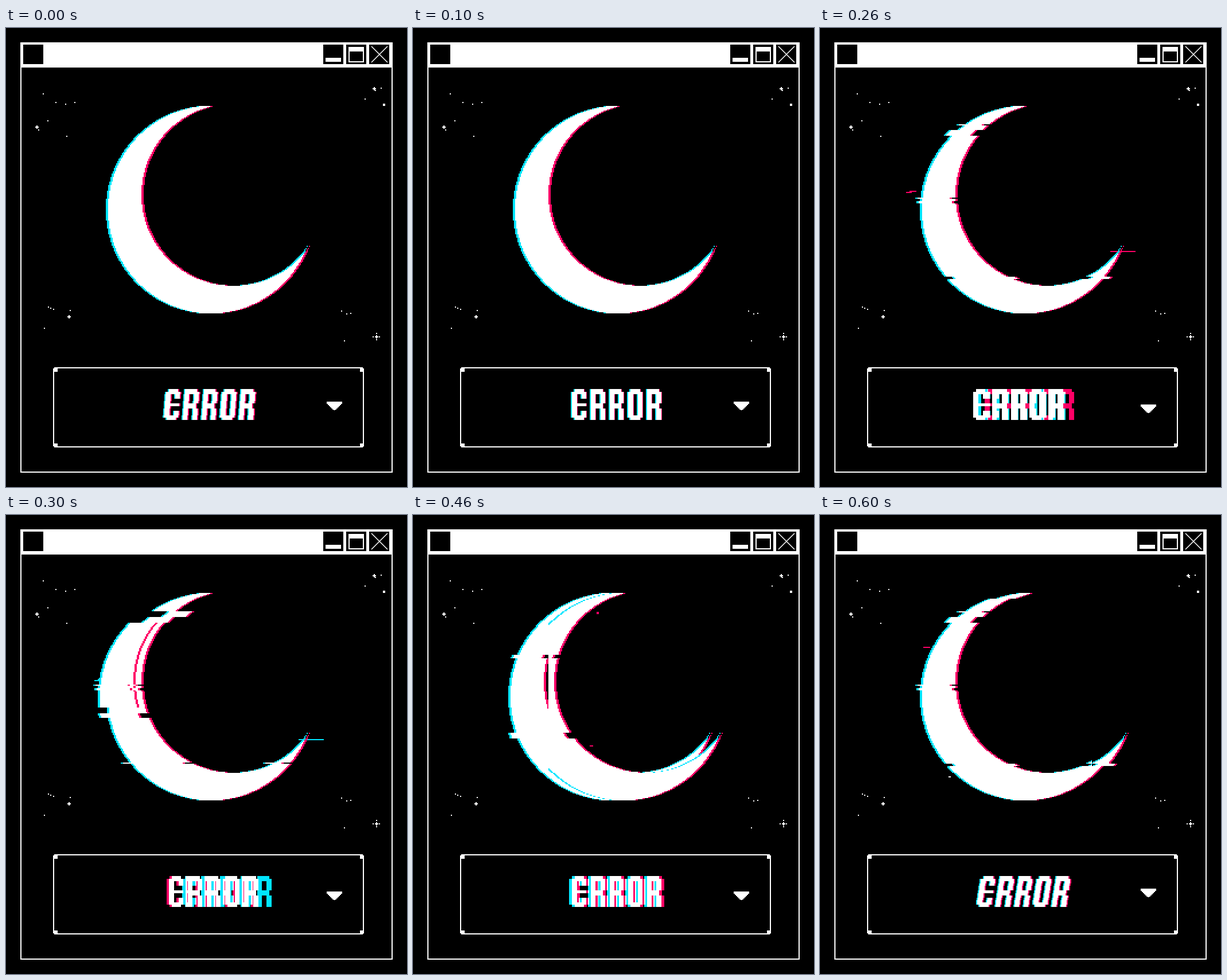
These frames come from a looping animation (699 px wide and 801 px high, 0.7 s). An HTML page with a canvas:

```html
<!DOCTYPE html>
<html lang="en">
<head>
<meta charset="utf-8">
<title>Error moon</title>
<style>
html, body { margin: 0; width: 100%; height: 100%; overflow: hidden; background: #000; }
canvas { display: block; }
</style>
</head>
<body>
<canvas id="stage" width="699" height="801"></canvas>
<script>
const g = document.getElementById('stage').getContext('2d');
const WHITE = '#fff', BLACK = '#000', CYAN = '#00e5ff', RED = '#ff0066';
const STEP = 100;

function box(color, x, y, w, h = w) {
  g.fillStyle = color;
  g.fillRect(x, y, w, h);
}

function frame(x, y, w, h) {
  g.strokeStyle = WHITE;
  g.lineWidth = 2;
  g.strokeRect(x + 1, y + 1, w - 2, h - 2);
}

function seeded(seed) {
  return () => (seed = seed * 16807 % 2147483647) / 2147483647;
}

// Colour split: white where both tints overlap
function tint(cyan, red) {
  return cyan && red ? WHITE : cyan ? CYAN : red ? RED : null;
}

function paint(left, top, right, bottom, size, colorAt) {
  for (let y = top; y < bottom; y += size) {
    for (let x = left; x < right; x += size) {
      const color = colorAt(x, y);
      if (color) box(color, x, y, size);
    }
  }
}

// Window

function drawTitleBar() {
  box(WHITE, 25, 25, 649, 44);
  for (const x of [30, 553, 593, 633]) box(BLACK, x, 29, 35, 34);
  box(WHITE, 557, 52, 27, 7);
  box(WHITE, 597, 33, 27);
  box(BLACK, 599, 41, 23, 17);
  g.lineWidth = 1.5;
  g.beginPath();
  g.moveTo(637, 32);
  g.lineTo(665, 60);
  g.moveTo(665, 32);
  g.lineTo(637, 60);
  g.stroke();
}

function sparkle(x, y) {
  box(WHITE, x - 3, y - 1, 6, 2);
  box(WHITE, x - 1, y - 3, 2, 6);
}

function starCluster(x, y, w, h, count) {
  const random = seeded(x * y);
  for (let i = 0; i < count; i++) {
    box(WHITE, Math.round(x + random() * w), Math.round(y + random() * h), 2);
  }
}

function drawSky() {
  starCluster(53, 88, 80, 180, 7);
  starCluster(599, 92, 60, 40, 3);
  starCluster(63, 461, 60, 107, 5);
  starCluster(580, 483, 48, 62, 4);
  box(WHITE, 657, 132, 4);
  sparkle(54, 173);
  sparkle(642, 106);
  sparkle(110, 504);
  sparkle(646, 539);
  for (const d of [-6, 5]) {
    box(WHITE, 645 + d, 538, 2);
    box(WHITE, 645, 538 + d, 2);
  }
}

function drawMessageBox() {
  frame(82, 592, 542, 140);
  for (const right of [0, 1]) {
    for (const low of [0, 1]) {
      box(BLACK, 82 + right * 540, 592 + low * 138, 2);
      box(WHITE, 84 + right * 533, 594 + low * 131, 6);
    }
  }
}

function drawCaret(y) {
  for (let i = 0; i < 8; i++) {
    const inset = 2 * Math.max(0, i - 1);
    box(WHITE, 559 + inset, y + 2 * i, 27 - 2 * inset, i < 7 ? 2 : 1);
  }
}

// Moon: one disc cut out of another, with torn rows and shifted ghosts

const inMoon = (x, y) =>
  Math.hypot(x - 357.5, y - 317) < 181.5 && Math.hypot(x - 396.5, y - 291) > 158.5;

const tear = (y, h, dx, from = 0, to = 699) => ({ y, h, dx, from, to });
const ghost = (dx, left = 140, top = 136, bottom = 498) => ({ dx, left, top, bottom });

function drawMoon(tears, ghosts) {
  for (const { dx, left, top, bottom } of ghosts) {
    paint(left, top, 570, bottom, 2, (x, y) => {
      let sx = x + 1 - dx;
      for (const t of tears) {
        if (y >= t.y && y < t.y + t.h && x >= t.from && x < t.to) sx -= t.dx;
      }
      return tint(inMoon(sx + 2, y + 1), inMoon(sx - 2, y + 1));
    });
  }
}

function drawStreak(color, x, y) {
  box(color, x, y, 44, 2);
  box(color, x - 350, y - 105, 12, 2);
  box(color, x - 356, y - 103, 10, 2);
}

// Word: each letter is a rule on a 6 by 13 grid

const roundCorner = (u, v) => (u === 0 || u === 5) && (v === 0 || v === 12);
const isCap = v => v < 2 || v > 10;
const LETTERS = {
  E: (u, v) => !roundCorner(u, v) &&
    (u < 2 || isCap(v) || v === 6 || (u > 3 && (v < 4 || v > 8))),
  R: (u, v) => !(u === 5 && (v === 0 || v === 6 || v === 7)) &&
    (u < 2 || u > 3 || v < 2 || v === 6 || v === 7),
  O: (u, v) => !roundCorner(u, v) && (u < 2 || u > 3 || isCap(v))
};

function inWord(x, v) {
  const pitch = 32.6, cell = 4.12;
  const index = Math.floor((x - 277) / pitch);
  const letter = LETTERS['ERROR'[index]];
  const u = Math.floor((x - 277 - index * pitch) / cell);
  return Boolean(letter) && u < 6 && letter(u, v);
}

function drawWord({ cyan = -2, red = 2, white = 0, slant = 0, rip = 0 }) {
  paint(250, 630, 480, 684, 1, (x, y) => {
    const v = Math.floor((y - 630) / 54 * 13);
    const lean = Math.round(slant * (0.5 - v / 12)) + (v === 5 || v === 6 ? rip : 0);
    const sx = x - lean;
    if (inWord(sx - white, v)) return WHITE;
    return tint(inWord(sx - cyan, v), inWord(sx - red, v));
  });
}

// Poses

const HAIRS = [tear(296, 2, -10), tear(302, 4, -6)];
const NICKS = [...HAIRS, tear(168, 2, -12), tear(178, 10, -13), tear(434, 4, 12)];

const POSES = [
  { word: { slant: 4 } },
  { word: { red: 1 } },
  {
    word: { cyan: -5, red: 10, white: -10 },
    low: true,
    tears: NICKS,
    extras() { drawStreak(RED, 506, 389); }
  },
  {
    word: { cyan: 30, red: 3, white: 7 },
    low: true,
    tears: [...HAIRS, tear(168, 10, 30), tear(178, 10, 8), tear(346, 8, -16), tear(432, 2, -16)],
    ghosts: [ghost(0), ghost(-14, 140, 188, 336)],
    extras() { drawStreak(CYAN, 510, 391); }
  },
  {
    word: { cyan: -5, red: 5 },
    low: true,
    tears: [tear(244, 6, -9), tear(380, 10, -12, 0, 400)],
    ghosts: [ghost(-8), ghost(10, 236)],
    extras() {
      box(RED, 320, 169, 4);
      box(RED, 308, 402, 6, 2);
    }
  },
  {
    word: { slant: 7, rip: -5 },
    tears: [tear(142, 2, -8), tear(146, 2, 8), tear(232, 22, 18), tear(350, 6, -8), tear(410, 2, -20)],
    extras() {
      box(WHITE, 323, 170, 4);
      box(RED, 314, 404, 4);
      box(CYAN, 224, 450, 4);
    }
  },
  {
    word: { slant: 8 },
    tears: [...NICKS, tear(136, 10, 10), tear(370, 68, 8, 474)],
    extras() {
      box(RED, 180, 230, 12, 2);
      box(WHITE, 224, 456, 4, 2);
    }
  }
];

function draw({ word, low = false, tears = [], ghosts = [ghost(0)], extras }) {
  box(BLACK, 0, 0, 699, 801);
  frame(25, 25, 649, 751);
  drawTitleBar();
  drawSky();
  drawMessageBox();
  if (extras) extras();
  drawMoon(tears, ghosts);
  drawWord(word);
  drawCaret(low ? 657 : 652);
}

let shown = -1;
function tick() {
  const pose = Math.floor(performance.now() / STEP) % POSES.length;
  if (pose !== shown) draw(POSES[shown = pose]);
  requestAnimationFrame(tick);
}
tick();
</script>
</body>
</html>
```
